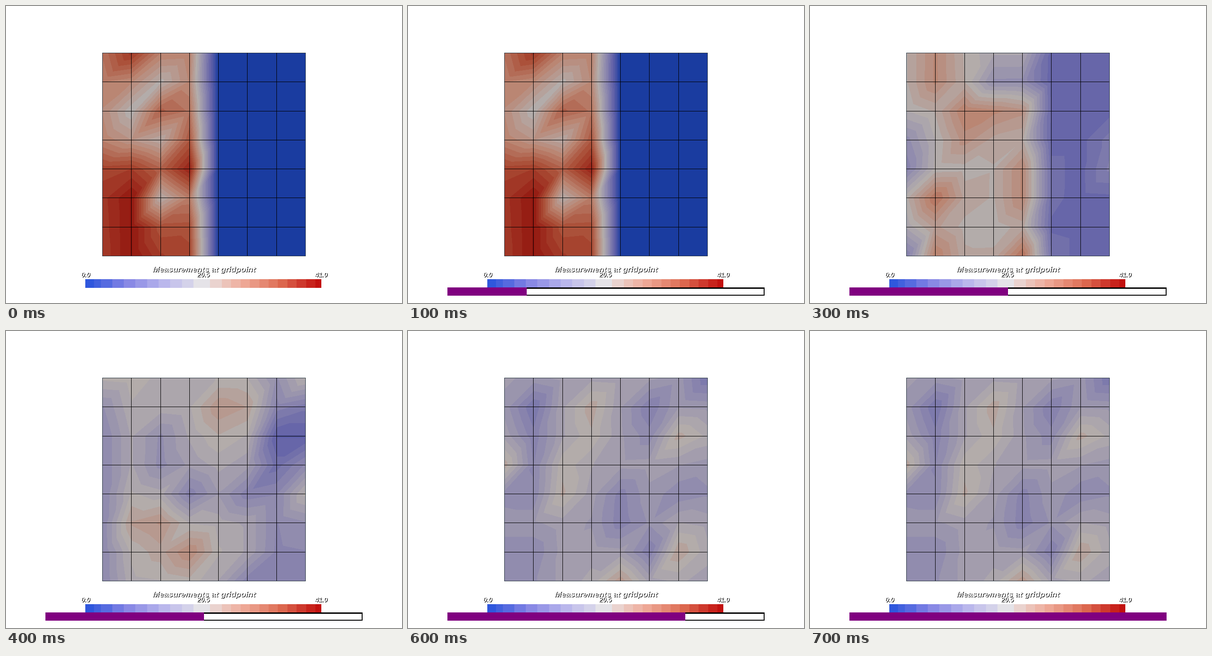
A matplotlib script for the animation above (0.8 s loop, 864 by 648 pixels).

```python
import numpy as np
import matplotlib.pyplot as plt
from matplotlib.animation import FuncAnimation
from matplotlib.colors import LinearSegmentedColormap
from matplotlib.patches import Rectangle
from matplotlib.tri import Triangulation

W, H, DPI = 864, 648, 100
PX = 72 / DPI
N = 8
VMAX = 41
rows, cols = np.indices((N, N))

SURFACE = LinearSegmentedColormap.from_list("surface", [
    "#1a3ca0", "#6060a8", "#8e89ae", "#b3adac", "#ba8572", "#aa4c35", "#93160f"])
LEGEND = LinearSegmentedColormap.from_list("legend", [
    "#2652dc", "#8282e4", "#bab7ec", "#e7e5e8", "#efac9a", "#dd6a51", "#c00a0a"])


def hills(points):
    return sum(np.exp(-1.6 * ((cols - c) ** 2 + (rows - r) ** 2))
               for c, r in points)


def field(base, strength, hot, cold):
    """Values around a base level, raised at hot and lowered at cold points."""
    return np.clip(base + strength * (hills(hot) - hills(cold)), 0, VMAX)


# Heat starts in the left half and spreads to the right; points are (col, row)
fields = [
    (cols < 4) * field(
        28 + 7 * (rows > 3), 9,
        hot=[(1, 0), (2, 2), (3, 3.5), (1, 5), (1, 6.5)],
        cold=[(2, 1), (1, 2), (2, 3), (2, 5), (2.4, 5)]),
    field(
        np.where(cols < 5, 20, 8), 10,
        hot=[(1, 0.5), (2, 2.4), (3.5, 2), (1.1, 5), (1, 7), (4, 4.5), (4, 7),
             (7.6, 3.6)],
        cold=[(3.5, 1), (0, 3.6), (0, 7)]),
    field(
        np.where((cols > 0) & (cols < 6), 19.5, 13.5), 7,
        hot=[(0, 0), (7, 0), (4.4, 1.2), (7, 4), (1.6, 5), (2.9, 6)],
        cold=[(7, 1.6), (6, 2.4), (2, 2.5), (3, 4), (5, 4), (5, 7)]),
    field(
        17.5, 7,
        hot=[(2.8, 1.4), (6.2, 2.3), (0, 3), (2, 3.5), (6, 6), (4, 7)],
        cold=[(7, 0), (1, 1), (5, 1.4), (1, 2.6), (0.5, 4), (6.4, 3.5),
              (4, 4.5), (5, 6), (0.5, 6.4)]),
]


def middles(edges):
    return (edges[:-1] + edges[1:]) / 2


def box(x0, y0, x1, y1, color, zorder=5):
    patch = Rectangle((x0, y0), x1 - x0, y1 - y0, fc=color, lw=0,
                      antialiased=False, zorder=zorder)
    return ax.add_patch(patch)


def shadowed(x, y, text, size):
    for shift, color in ((1, "black"), (0, "white")):
        ax.text(x + shift, y + shift, text, color=color, fontsize=size * PX,
                family="Liberation Sans", style="italic", weight="bold",
                ha="center", va="baseline", antialiased=False, zorder=8)


fig = plt.figure(figsize=(W / DPI, H / DPI), dpi=DPI, facecolor="white")
ax = fig.add_axes([0, 0, 1, 1])

# Mesh with every cell split from lower left to upper right
LEFT, TOP, SIDE = 210, 102, 443
steps = np.arange(N) * SIDE / (N - 1) + 0.5
corners = [r * N + c for r in range(N - 1) for c in range(N - 1)]
triangles = [t for i in corners
             for t in ((i, i + 1, i + N), (i + 1, i + N + 1, i + N))]
mesh = Triangulation(LEFT + steps[cols].ravel(), TOP + steps[rows].ravel(),
                     triangles)
levels = np.arange(-0.8, VMAX + 2, 1.6)
surfaces = [ax.tricontourf(mesh, values.ravel(), levels=levels,
                           colors=SURFACE(middles(levels) / VMAX))
            for values in fields]

for i, offset in enumerate(np.floor(steps)):
    color = "#26343f" if i in (0, N - 1) else "black"
    x, y = LEFT + offset, TOP + offset
    box(x, TOP, x + 1, TOP + SIDE + 1, color)
    box(LEFT, y, LEFT + SIDE + 1, y + 1, color)

# Colour legend: wider bands on the blue side, narrower on the red side
X0, X1 = 173, 688
edges = np.r_[X0, 192, np.arange(206.5, 410, 25.3), 445,
              np.arange(471, X1, 20.4), X1]
for x0, x1, color in zip(edges, edges[1:],
                         LEGEND((middles(edges) - X0) / (X1 - X0))):
    box(x0, 596, x1, 615, color)

shadowed(432, 580, "Measurements at gridpoint", 17.5)
for share in (0, 0.5, 1):
    shadowed(174 + 514 * share, 591, f"{VMAX * share:.1f}", 14)

BAR_X, BAR_W = 86, 692
progress_bar = [
    box(BAR_X, 614, BAR_X + BAR_W, 632, "black", 9),
    box(BAR_X + 2, 617, BAR_X + BAR_W - 2, 630, "white", 10),
    box(BAR_X, 614, BAR_X, 632, "purple", 11),
]

ax.set(xlim=(0, W), ylim=(H, 0))
ax.axis("off")


def draw(frame):
    for i, surface in enumerate(surfaces):
        surface.set_visible(i == frame // 2)
    # Bar and field advance on alternate frames
    done = (frame + 1) // 2 / len(fields)
    for patch in progress_bar:
        patch.set_visible(done > 0)
    progress_bar[-1].set_width(BAR_W * done)
    return [*surfaces, *progress_bar]


animation = FuncAnimation(fig, draw, frames=2 * len(fields), interval=100,
                          repeat=True, repeat_delay=0, blit=False)
plt.show()
```
